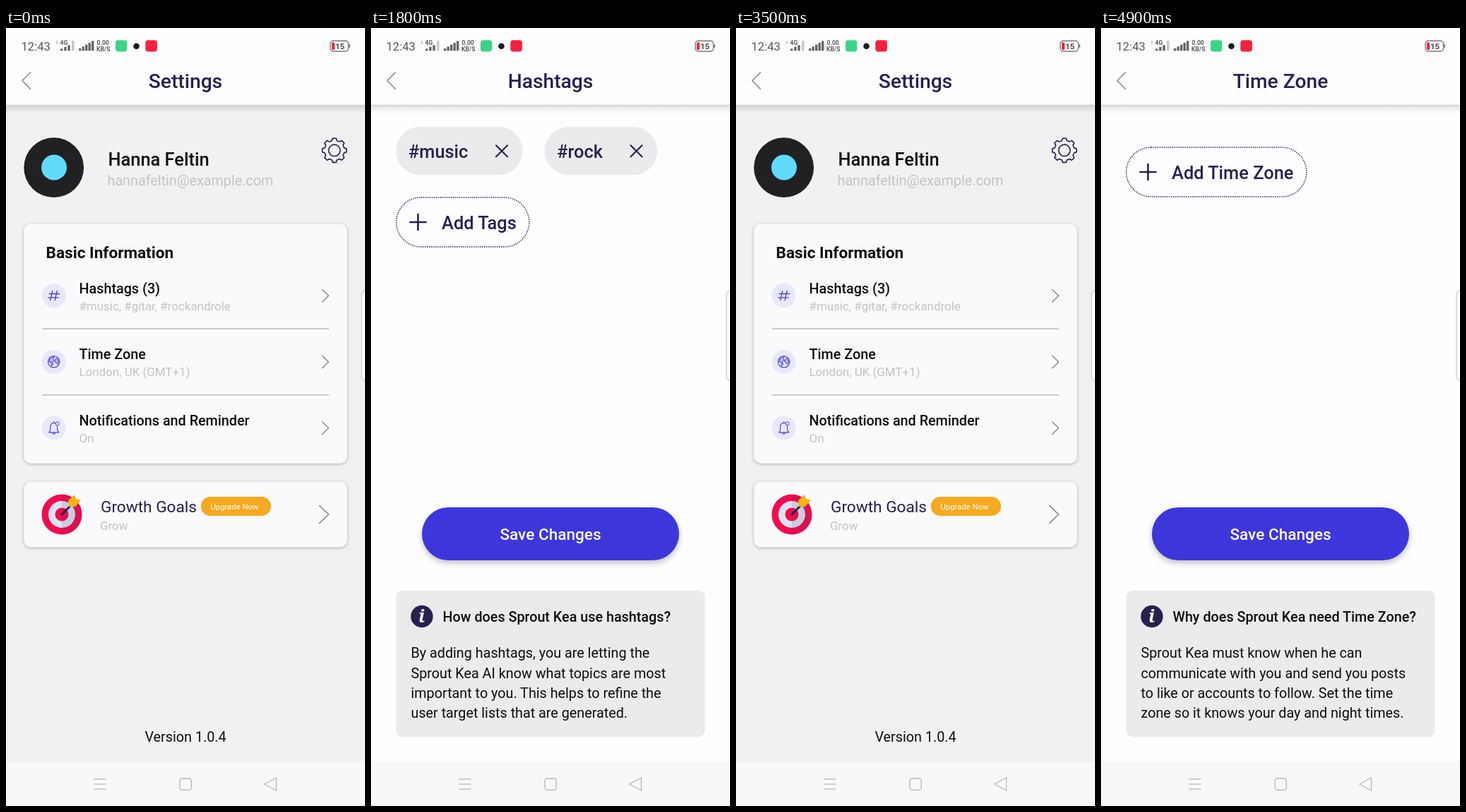
These frames come from a looping animation (508 px wide and 1102 px high, 5000 ms). An HTML page:

```html
<!DOCTYPE html>
<html lang="en">
<head>
<meta charset="utf-8">
<title>Settings screens</title>
<style>
html, body { margin: 0; width: 100%; height: 100%; overflow: hidden; background: #fefdff; }
svg { display: block; }
text { font-family: Roboto, "Noto Sans", sans-serif; fill: #0e0d10; white-space: pre; }
.title { font-size: 28.2px; font-weight: 500; fill: #27214d; text-anchor: middle; }
.name { font-size: 25.4px; font-weight: 500; }
.chip { font-size: 25.4px; font-weight: 500; fill: #27214d; }
.head { font-size: 22.6px; font-weight: 700; }
.goal { font-size: 22.6px; fill: #27214d; }
.save { font-size: 22.6px; font-weight: 500; fill: #fff; text-anchor: middle; }
.item { font-size: 19.76px; font-weight: 500; }
.body { font-size: 19.76px; }
.mail { font-size: 19.76px; fill: #c3c2c5; }
.sub { font-size: 16.93px; fill: #c3c2c5; }
.tiny { font-size: 11.3px; fill: #fff; }
.mid { text-anchor: middle; }
.clock { font-size: 16.6px; fill: #58575a; }
.net { font-size: 8.6px; font-weight: 700; fill: #5c5b5e; }
.line { fill: none; stroke-linecap: round; stroke-linejoin: round; }
.card { fill: #faf9fc; filter: drop-shadow(0 1.5px 2px rgba(0,0,0,.28)); }
.button { fill: #3d36db; filter: drop-shadow(0 4px 4px rgba(0,0,0,.24)); }
</style>
</head>
<body>
<svg id="stage" width="508" height="1102" viewBox="0 0 508 1102"></svg>
<script>
const NAVY = '#27214d', INDIGO = '#4a43d0', RED = '#f50a4f', GREY = '#858488';
const TOP = 40, HEIGHT = 1000, LOOP = 5000;

const text = (x, y, cls, s) => `<text x="${x}" y="${y}" class="${cls}">${s}</text>`;
const rect = (x, y, w, h, r, attrs) =>
  `<rect x="${x}" y="${y}" width="${w}" height="${h}" rx="${r}" ${attrs}/>`;
const circle = (x, y, r, attrs) => `<circle cx="${x}" cy="${y}" r="${r}" ${attrs}/>`;
const line = (d, color, width) =>
  `<path class="line" d="${d}" stroke="${color}" stroke-width="${width}"/>`;

const header = title =>
  rect(0, 110, 508, 11, 0, 'fill="url(#fade)"') +
  rect(0, TOP, 508, 69.5, 0, 'fill="#fefdff"') +
  rect(0, 108.8, 508, 1.4, 0, 'fill="#cfced1"') +
  line('M34.5 63 23 74.5 34.5 86.5', GREY, 1.5) +
  text(254, 85, 'title', title);

function gear(x, y) {
  const points = [];
  for (let i = 0; i < 8; i++) {
    for (const [turn, r] of [[-14, 14.2], [-8.5, 17.3], [8.5, 17.3], [14, 14.2]]) {
      const a = (i * 45 + turn) * Math.PI / 180;
      points.push((x + r * Math.sin(a)).toFixed(2) + ' ' + (y - r * Math.cos(a)).toFixed(2));
    }
  }
  return line('M' + points.join('L') + 'Z', NAVY, 1.6) +
    circle(x, y, 8.2, `fill="none" stroke="${NAVY}" stroke-width="1.6"`);
}

const icons = {
  hash: line('M-2 -6.5-5 6.5M4.5 -6.5 1.5 6.5M-6.5 -2.5H8M-8 2.8H6.5', INDIGO, 1.3),
  globe: circle(0, 0, 8.2, `fill="none" stroke="${INDIGO}" stroke-width="1.2"`) +
    `<path d="M-6-4Q-3-8 1-7L-1-4 1-2-2 0-1 4-3 6-4 1-7 0ZM3-5 6-4 7 0 5 4 3 1 1 0Z" fill="${INDIGO}" fill-opacity=".35" stroke="${INDIGO}" stroke-width="1"/>`,
  bell: line('M-7 6.5H7L5 3.5V-1Q5-7 0-7T-5-1V3.5ZM-2 7Q0 11 2 7M0-7V-9', INDIGO, 1.1) +
    circle(5, -6, 2.6, `fill="#e9e8fa" stroke="${INDIGO}" stroke-width="1"`)
};

const row = (i, icon, label, sub) => `<g transform="translate(0 ${i * 93.7})">` +
  circle(67.7, 379, 17, 'fill="#e9e8fb"') +
  `<g transform="translate(67.7 379)">${icons[icon]}</g>` +
  text(103.5, 375.8, 'item', label) + text(103.5, 399.5, 'sub', sub) +
  line('M447.5 370.5 456.5 379.2 447.5 388', GREY, 1.4) +
  (i < 2 ? rect(51, 425.3, 406, 1.5, 0, 'fill="#bdbcc0"') : '') + '</g>';

const target =
  circle(79, 689, 28.5, `fill="${RED}"`) + circle(79, 689, 19, 'fill="#dce4f2"') +
  circle(79, 689, 9.5, `fill="${RED}"`) +
  '<path d="M79 660.5A28.5 28.5 0 0 1 79 717.5Z" fill="#40305a" fill-opacity=".13"/>' +
  line('M79 689 93 675', NAVY, 3) +
  '<path d="M89 678 88 669 97 661 99 667 106 669 98 678Z" fill="#fbb214"/>';

const settings =
  rect(0, TOP, 508, HEIGHT, 0, 'fill="#f1f0f2"') + header('Settings') +
  circle(67.7, 197.7, 42.4, 'fill="#212023"') + circle(68, 197.5, 18, 'fill="#61dafb"') +
  text(144.5, 194.5, 'name', 'Hanna Feltin') +
  text(143.5, 222.7, 'mail', 'hannafeltin@example.com') + gear(464.7, 173.3) +
  rect(25.3, 277.5, 457.4, 339.3, 10, 'class="card"') +
  text(56.5, 326.3, 'head', 'Basic Information') +
  row(0, 'hash', 'Hashtags (3)', '#music, #gitar, #rockandrole') +
  row(1, 'globe', 'Time Zone', 'London, UK (GMT+1)') +
  row(2, 'bell', 'Notifications and Reminder', 'On') +
  rect(25.3, 642.5, 457.4, 93, 10, 'class="card"') + target +
  text(134, 686.3, 'goal', 'Growth Goals') + text(133, 711, 'sub', 'Grow') +
  rect(275.7, 664, 99.3, 27, 13.5, 'fill="#f4a920"') +
  text(289.5, 682, 'tiny', 'Upgrade Now') +
  line('M443.5 676.5 456.5 689 443.5 701.5', GREY, 1.6) +
  text(254, 1011.3, 'body mid', 'Version 1.0.4');

const chip = (x, w, label) => rect(x, 140, w, 68.3, 34.1, 'fill="#ebeaec"') +
  text(x + 17.5, 184, 'chip', label) +
  line(`M${x + w - 37.5} 166.3l16 16m0-16l-16 16`, NAVY, 2.2);

const addButton = (y, w, label) =>
  rect(35.8, y, w, 70, 35, `fill="none" stroke="${NAVY}" stroke-width="1.4" stroke-dasharray="1.5 1.5"`) +
  line(`M55.5 ${y + 35}h22m-11-11v22`, NAVY, 2.6) + text(100, y + 44.7, 'chip', label);

const editor = (title, tools, question, answer) =>
  rect(0, TOP, 508, HEIGHT, 0, 'fill="#fefdff"') + header(title) + tools +
  rect(72, 679, 364, 75, 37.5, 'class="button"') +
  text(254, 725, 'save', 'Save Changes') +
  rect(35.5, 797, 437, 207, 9, 'fill="#ebeaec"') +
  circle(72, 833.5, 15.7, `fill="${NAVY}"`) +
  '<text x="71.5" y="842" text-anchor="middle" style="font:italic bold 26px \'Noto Serif\',serif;fill:#fff">i</text>' +
  text(101.5, 841.3, 'item', question) +
  answer.map((s, i) => text(56.5, 892.3 + i * 28.25, 'body', s)).join('');

const hashtags = editor('Hashtags',
  chip(35.3, 179.2, '#music') + chip(245.5, 159.5, '#rock') + addButton(240, 188, 'Add Tags'),
  'How does Sprout Kea use hashtags?',
  ['By adding hashtags, you are letting the', 'Sprout Kea AI know what topics are most',
   'important to you. This helps to refine the', 'user target lists that are generated.']);

const timeZone = editor('Time Zone', addButton(169, 255, 'Add Time Zone'),
  'Why does Sprout Kea need Time Zone?',
  ['Sprout Kea must know when he can', 'communicate with you and send you posts',
   'to like or accounts to follow. Set the time', 'zone so it knows your day and night times.']);

const bars = (x, base, count, step, tallest, faint) => Array.from({ length: count }, (_, i) => {
  const h = tallest * (i + 1.3) / (count + .3);
  return rect(x + i * step, base - h, 3.4, h, .6, `fill="${i < faint ? '#656467' : '#c9c8cb'}"`);
}).join('');

const statusBar =
  rect(0, 0, 508, TOP, 0, 'fill="#fefdff"') +
  text(21.5, 32, 'clock', '12:43') +
  rect(71, 18, 2, 5, 0, 'fill="#c9c8cb"') + text(76.5, 23.5, 'net', '4G') +
  bars(77, 32.3, 3, 5.2, 8, 3) + rect(93, 18, 3.6, 14.3, .6, 'fill="#c9c8cb"') +
  bars(103, 32.3, 5, 4.5, 14, 5) +
  text(128.5, 24.3, 'net', '0.00') + text(128, 32.8, 'net', 'KB/S') +
  rect(155, 17.3, 16.3, 16.3, 4, 'fill="#3bd487"') +
  circle(184.5, 25.7, 4.3, 'fill="#1b1a1c"') +
  rect(197.3, 17.3, 16.6, 16.3, 4, 'fill="#f4213f"') +
  rect(459, 18.2, 25.5, 14.8, 4, 'fill="none" stroke="#77767a" stroke-width="1.4"') +
  rect(485.3, 23, 1.7, 5, .8, 'fill="#77767a"') +
  rect(461, 20.2, 4, 10.8, 1.5, 'fill="#f4213f"') +
  '<text x="466" y="29.8" style="font-size:11.5px;font-weight:700;fill:#4a494c">15</text>';

const navBar =
  rect(0, 1039.5, 508, 63, 0, 'fill="#f8f7fa"') +
  rect(299.5, 1040, 152.5, 62, 31, 'id="ripple" fill="#eeedf0"') +
  line('M124.5 1064H141M124.5 1071H141M124.5 1078H141', '#c1c0c3', 1.3) +
  rect(246, 1063, 16.3, 16.3, 3.5, 'fill="none" stroke="#b5b4b7" stroke-width="1.3"') +
  line('M365.5 1071 382.5 1062V1080Z', '#b5b4b7', 1.3);

document.getElementById('stage').innerHTML =
  `<defs>
    <linearGradient id="fade" x2="0" y2="1">
      <stop stop-color="#000" stop-opacity=".11"/><stop offset="1" stop-color="#000" stop-opacity="0"/>
    </linearGradient>
    <clipPath id="reveal"><rect id="window" width="508" height="1102"/></clipPath>
  </defs>
  <g id="back">${settings}${rect(0, TOP, 508, HEIGHT, 0, 'id="shade"')}</g>
  <g id="front" clip-path="url(#reveal)"><g id="sheet">
    <g id="tags">${hashtags}</g><g id="zone">${timeZone}</g>
  </g></g>` + statusBar + navBar +
  rect(503, 372.5, 12, 126.5, 5, 'fill="#fefdff" stroke="#cfced1" stroke-width="1.3"') +
  circle(0, 0, 15.5, 'id="touch" fill="#f8f7fc" fill-opacity=".65" stroke="#c3c4d6" stroke-opacity=".8" stroke-width="2"');

const el = Object.fromEntries([...document.querySelectorAll('[id]')].map(e => [e.id, e]));
const set = (id, name, value) => el[id].setAttribute(name, value);
const clamp = v => Math.min(1, Math.max(0, v));

// Cubic bezier (.35, .45, 0, 1)
function ease(x) {
  if (x <= 0) return 0;
  if (x >= 1) return 1;
  let lo = 0, hi = 1;
  for (let i = 0; i < 30; i++) {
    const s = (lo + hi) / 2;
    if (1.05 * s * (1 - s) ** 2 + s ** 3 < x) lo = s; else hi = s;
  }
  return 1.35 * lo * (1 - lo) ** 2 + 3 * lo * lo * (1 - lo) + lo ** 3;
}
const slide = (t, start) => ease((t - start) / 425);

const touches = [[980, 1290, 145, 380], [3980, 4240, 145, 473]];

function draw(t) {
  const first = t < 3800;
  const p = first ? slide(t, 1364) - slide(t, 3066) : slide(t, 4283);
  set('back', 'transform', `translate(0 ${-.02 * HEIGHT * p})`);
  set('shade', 'opacity', .1 * clamp(p / .36));
  set('front', 'display', p > 0 ? 'inline' : 'none');
  set('window', 'y', TOP + HEIGHT * (1 - p));
  set('sheet', 'transform', `translate(0 ${.041 * HEIGHT * (1 - p)})`);
  set('tags', 'display', first ? 'inline' : 'none');
  set('zone', 'display', first ? 'none' : 'inline');

  const grow = .6 + .4 * clamp((t - 2680) / 300);
  set('ripple', 'opacity', clamp((t - 2680) / 120) * clamp((3190 - t) / 80));
  set('ripple', 'transform', `translate(375.75 1071) scale(${grow}) translate(-375.75 -1071)`);

  const tap = touches.find(([from, to]) => t >= from && t < to);
  set('touch', 'opacity', tap ? clamp((t - tap[0]) / 60) * clamp((tap[1] - t) / 60) : 0);
  if (tap) set('touch', 'transform', `translate(${tap[2]} ${tap[3]})`);
}

const origin = performance.now();
function tick() {
  draw((performance.now() - origin) % LOOP);
  requestAnimationFrame(tick);
}
tick();
</script>
</body>
</html>
```
